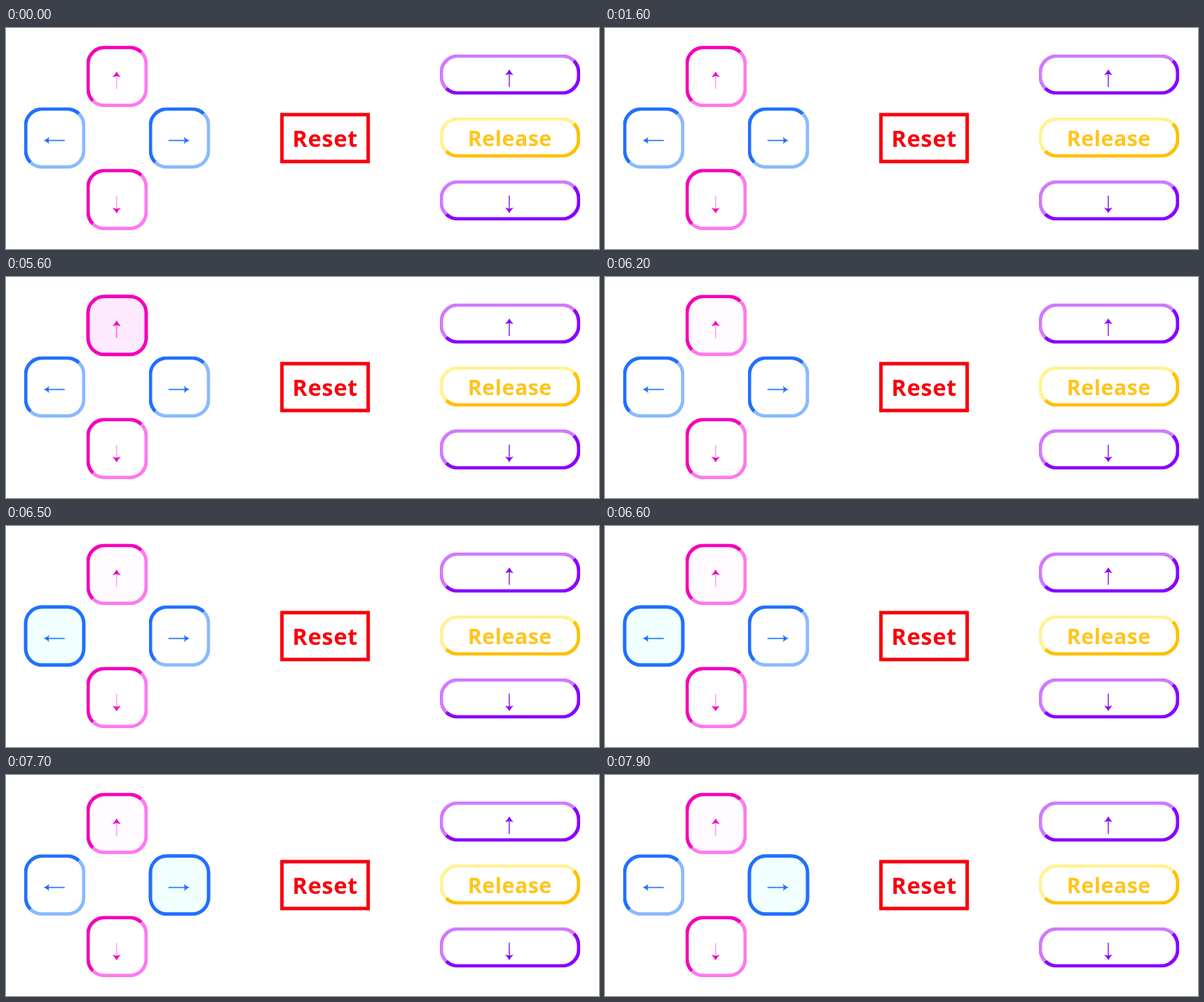
Recreate the animation shown at these times as an HTML page. Size 846 by 316 pixels, loop 8000 ms.

```html
<!DOCTYPE html>
<html lang="en">
<head>
<meta charset="utf-8">
<title>Arm controls</title>
<style>
html, body { margin: 0; width: 100%; height: 100%; overflow: hidden; background: #fff; }
/* the whole panel has slightly soft edges */
.panel { position: absolute; left: 0; top: 0; width: 846px; height: 316px; filter: blur(.5px); }
.key, .bar, .reset { position: absolute; box-sizing: border-box; }
.key, .bar { border: 5px solid; border-radius: 26px; border-color: var(--tl) var(--br) var(--br) var(--tl); }
.key { width: 88px; height: 88px; transform: translate(.5px, .3px); animation: 8s step-end infinite; }
.bar { left: 618px; width: 201px; height: 58px; transform: translate(.5px, .5px); }
.pink { --tl: #f500b8; --br: #ff78ee; --head: #f500b8; --shaft: #ffb4f5; }
.blue { --tl: #2070ff; --br: #8abaff; --head: #2070ff; --shaft: #3f8cff; }
.purple { --tl: #d07aff; --br: #8a00ff; --head: #8a00ff; --shaft: #a658f8; }
.yellow { --tl: #fff394; --br: #ffc000; }
.up { left: 114px; top: 25px; animation-name: up; }
.left { left: 25px; top: 113px; animation-name: left; }
.right { left: 203px; top: 113px; animation-name: right; }
.down { left: 114px; top: 201px; animation-name: down; }
.reset { left: 391px; top: 121px; width: 128px; height: 72px; border: 5.5px solid #f9000d; transform: translate(.2px, .4px); }
.key svg, .bar svg { position: absolute; left: -5px; top: -5px; width: 1px; height: 1px; overflow: visible; }
.labels { position: absolute; left: 0; top: 0; }
text { font: bold 32.5px "Noto Sans", "Open Sans", sans-serif; }

@keyframes up {
  0%, 100% { background: #fff; --br: #ff78ee; --shaft: #ffb4f5; }
  70% { background: #fdeaff; --br: #f500b8; --shaft: #ff7eee; }
  77.5% { background: #fffbff; --br: #ff78ee; --shaft: #ffb4f5; }
}
@keyframes left {
  0%, 90%, 100% { background: #fff; --br: #8abaff; }
  81.25% { background: #f1ffff; --br: #2070ff; }
}
@keyframes down {
  0%, 96.25%, 100% { background: #fff; --br: #ff78ee; --shaft: #ffb4f5; }
  90% { background: #fdeaff; --br: #f500b8; --shaft: #ff7eee; }
}
@keyframes right {
  0%, 100% { background: #fff; --br: #8abaff; }
  96.25% { background: #f1ffff; --br: #2070ff; }
}
</style>
</head>
<body>
<svg width="0" height="0" style="position:absolute">
  <defs>
    <g id="tall">
      <path d="M0-7V12.5" style="stroke:var(--shaft);stroke-width:2"/>
      <path d="M0-12.5Q2.5-8 6-4.5Q2.5-5.5 0-6Q-2.5-5.5-6-4.5Q-2.5-8 0-12.5Z" style="fill:var(--head)"/>
    </g>
    <g id="wide">
      <path d="M-11 0H15" style="stroke:var(--shaft);stroke-width:2"/>
      <path d="M-15 0Q-9-2.5-7-5.5Q-8-2-8 0Q-8 2-7 5.5Q-9 2.5-15 0Z" style="fill:var(--head)"/>
    </g>
  </defs>
</svg>

<div class="panel">
  <div class="key pink up"><svg><use href="#tall" transform="translate(43.3 49.5)"/></svg></div>
  <div class="key blue left"><svg><use href="#wide" transform="translate(43.3 47.5)"/></svg></div>
  <div class="key blue right"><svg><use href="#wide" transform="translate(43.3 47.5) rotate(180)"/></svg></div>
  <div class="key pink down"><svg><use href="#tall" transform="translate(43.3 51.3) rotate(180)"/></svg></div>

  <div class="reset"></div>

  <div class="bar purple" style="top:37px"><svg><use href="#tall" transform="translate(99.5 34.2)"/></svg></div>
  <div class="bar yellow" style="top:127px"></div>
  <div class="bar purple" style="top:217px"><svg><use href="#tall" transform="translate(99.5 34.7) rotate(180)"/></svg></div>

  <svg class="labels" width="846" height="316">
    <text x="408.5" y="170" fill="#f9000d" letter-spacing=".7">Reset</text>
    <text x="658.8" y="168.5" fill="#ffc51c" style="font-size:30.5px" letter-spacing=".4">Release</text>
  </svg>
</div>
</body>
</html>
```
